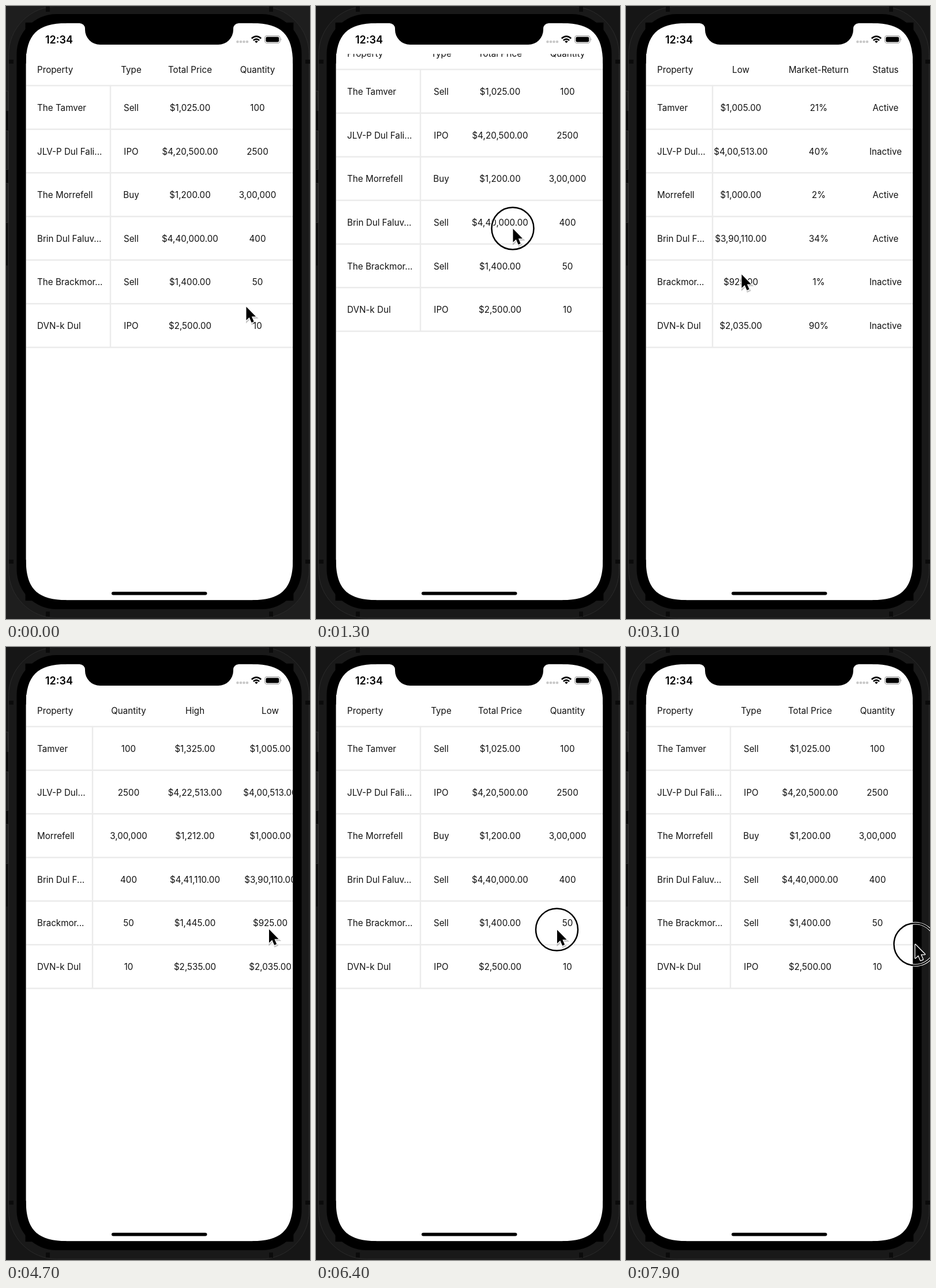
These frames come from a looping animation (527x1063 px, 8000 ms). An HTML page:

```html
<!DOCTYPE html>
<html lang="en">
<head>
<meta charset="utf-8">
<title>Portfolio table</title>
<style>
html, body { margin: 0; width: 100%; height: 100%; overflow: hidden; background: #161616; }
svg { display: block; width: 100%; height: 100%; }
text { font: 15.2px Inter, "Open Sans", sans-serif; fill: #111; }
.mid { text-anchor: middle; }
.clock { font-size: 18px; font-weight: 600; fill: #000; }
</style>
</head>
<body>
<svg viewBox="0 0 527 1063">
  <defs>
    <clipPath id="view"><rect x="35" y="83" width="462" height="900"/></clipPath>
    <path id="arrow" d="M0 0V23.5L5.3 18.5L9.2 27.5L13.2 25.8L9.4 17H16.6Z"/>
    <path id="corner" d="M-1 -1H70V0C20 0 0 20 0 70H-1Z"/>
  </defs>

  <rect id="back" width="527" height="1063"/>
  <rect x="4.5" y="0.5" width="521" height="1061" rx="84" fill="#191919" stroke="#2b2b2b"/>
  <g id="bands" fill="#0b0b0b"><path d="M0 182H4V216H0ZM0 284H4V307H0ZM0 375H3V450H0Z"/></g>
  <path d="M0 147.5H3.5V182M0 216.5H3.5V283.5H0M0 307.5H3.5V375.5H0" fill="#1c1c1c" stroke="#303030"/>
  <rect x="18.5" y="14" width="494" height="1032" rx="69"/>
  <rect x="34.6" y="29.8" width="462.6" height="1000.4" fill="#fff"/>
  <g id="corners"></g>

  <g clip-path="url(#view)">
    <g id="table">
      <g id="cells"></g>
      <rect id="cover" x="35" y="60" height="536" fill="#fff"/>
      <g id="lines" stroke="#ebebeb" stroke-width="2.5"></g>
      <g id="names"></g>
    </g>
  </g>

  <path d="M128 29V30A9 9 0 0 1 137 39V41A26 26 0 0 0 163 67H368A26 26 0 0 0 394 41V39A9 9 0 0 1 403 30V29Z"/>
  <text class="clock" x="68" y="64.5">12:34</text>
  <g id="dots" fill="#c9c9c9"></g>
  <g fill="none" stroke="#000" stroke-width="2.6">
    <path d="M425.8 56.3Q434 48.8 442.2 56.3M428.8 59.6Q434 55 439.2 59.6"/>
    <path d="M434 64.2L431.2 61.4Q434 59.2 436.8 61.4Z" fill="#000" stroke="none"/>
  </g>
  <rect x="448.6" y="51.6" width="26.4" height="12.8" rx="4" fill="none" stroke="#a2a2a2" stroke-width="1.2"/>
  <rect x="450.4" y="53.4" width="22.8" height="9.2" rx="2.4"/>
  <path d="M476.3 55.8Q478.6 58 476.3 60.2Z" fill="#a2a2a2"/>
  <rect x="183" y="1015.7" width="165.5" height="5.8" rx="2.9"/>

  <g id="pointer">
    <g id="ring" fill="none">
      <circle r="36.5" stroke="#fff" stroke-width="4.4"/>
      <circle r="36.5" stroke="#000" stroke-width="2.5"/>
    </g>
    <g transform="translate(.5 .5)">
      <use href="#arrow" transform="translate(1 2)" opacity=".22" stroke="#000" stroke-width="3"/>
      <use href="#arrow" stroke="#fff" stroke-width="2.6" stroke-linejoin="round"/>
      <use href="#arrow"/>
    </g>
  </g>
</svg>
<script>
const $ = id => document.getElementById(id);
const LOOP = 8000, STEP = 100, ROW = 75.65, TOP = 138;
const WIDE = 181, NARROW = 150, REACH = 482.5;

const add = (parent, tag, attrs, text = "") => {
  const el = document.createElementNS("http://www.w3.org/2000/svg", tag);
  for (const k in attrs) el.setAttribute(k, attrs[k]);
  el.textContent = text;
  $(parent).append(el);
  return el;
};
const rowY = i => i < 0 ? 116 : TOP + ROW * (i + 0.5) + 6.05;

// Phone details, mirrored about the centre of the screen
for (const sx of [1, -1]) for (const sy of [1, -1]) {
  const flip = `translate(266 530) scale(${sx} ${sy})`;
  add("corners", "use", { href: "#corner", transform: `${flip} translate(-231.4 -500.2)` });
  add("bands", "path", { d: "M-197 -529h7v9h-7ZM-261 -437h8v7h-8Z", transform: flip });
}
for (let i = 0; i < 4; i++) add("dots", "circle", { cx: 401.5 + 5.5 * i, cy: 62, r: 2.3 });

const columns = [
  [217, "Type", "Sell IPO Buy Sell Sell IPO"],
  [319, "Total Price", "$1,025.00 $4,20,500.00 $1,200.00 $4,40,000.00 $1,400.00 $2,500.00"],
  [436, "Quantity", "100 2500 3,00,000 400 50 10"],
  [551, "High", "$1,325.00 $4,22,513.00 $1,212.00 $4,41,110.00 $1,445.00 $2,535.00"],
  [681.5, "Low", "$1,005.00 $4,00,513.00 $1,000.00 $3,90,110.00 $925.00 $2,035.00"],
  [816.5, "Market-Return", "21% 40% 2% 34% 1% 90%"],
  [932.5, "Status", "Active Inactive Active Active Inactive Inactive"]
];
for (const [x, head, values] of columns)
  [head, ...values.split(" ")].forEach((s, i) =>
    add("cells", "text", { class: "mid", x, y: rowY(i - 1) }, s));

// Wide and narrow label of each row
const labels = [
  ["The Tamver", "Tamver"],
  ["JLV-P Dul Fali...", "JLV-P Dul..."],
  ["The Morrefell", "Morrefell"],
  ["Brin Dul Faluv...", "Brin Dul F..."],
  ["The Brackmor...", "Brackmor..."],
  ["DVN-k Dul", "DVN-k Dul"]
];
add("names", "text", { x: 54, y: rowY(-1) }, "Property");
const names = labels.map((l, i) => add("names", "text", { x: 54, y: rowY(i) }, l[0]));

for (let i = 0; i < 7; i++) {
  const y = TOP + i * ROW;
  add("lines", "line", { x1: 35, x2: 497, y1: y, y2: y });
}
const edge = add("lines", "line", { y1: TOP, y2: TOP + 6 * ROW });

const ease = (t, from, to) => {
  const u = Math.min(1, Math.max(0, (t - from) / (to - from)));
  return u * u * (3 - 2 * u);
};

// Pointer glides: start, end, goal; it rests in between
const HOME = { x: 416, y: 521 };
const glides = [
  [0, 200, 341, 438], [200, 1300, 341, 386], [1800, 2300, 448, 535],
  [2400, 2800, 200, 465], [3900, 4600, 455.5, 489], [4800, 5400, 290, 175],
  [5500, 6000, 425, 518], [6300, 6400, 417.5, 490], [6400, 7000, 115, 480],
  [7100, 7900, 501, 515.5]
];
const presses = [[200, 1500], [2200, 2800], [4000, 4600], [6000, LOOP]];
const GRAB = 438, FREE = 1500;

// Fading up and down swing of the first drag
const shake = t => t < 200 || t > FREE ? 0 :
  290 * Math.sin(2 * Math.PI * (t - 200) / 650) * Math.exp(-(((t - 200) / 800) ** 6));

function pointer(t) {
  let { x, y } = HOME;
  for (const [from, to, gx, gy] of glides) {
    const k = ease(t, from, to);
    x += (gx - x) * k;
    y += (gy - y) * k;
  }
  return { x, y: y + shake(t) };
}

const rubber = d => Math.sign(d) * 930 * (1 - 1 / (Math.abs(d) * 0.55 / 930 + 1));
function bounce(t) {
  if (t < 200 || t >= 1900) return 0;
  const pull = rubber(pointer(Math.min(t, FREE)).y - GRAB);
  return pull * Math.exp(Math.min(0, FREE - t) / 110);
}

const sideScroll = (t, x) => t < 6300
  ? REACH * (ease(t, 2400, 3100) - ease(t, 3900, 5425))
  : Math.max(0, 417.5 - x);

function draw(now) {
  const t = Math.floor((now % LOOP) / STEP) * STEP;
  const { x, y } = pointer(t);
  const side = sideScroll(t, x);
  const pin = Math.max(NARROW, WIDE - side);
  const narrow = side > 12 ? 1 : 0;

  $("back").setAttribute("fill", t < 100 ? "#1e1e1e" : "#161616");
  $("table").setAttribute("transform", `translate(0 ${bounce(t)})`);
  $("cells").setAttribute("transform", `translate(${-side} 0)`);
  $("cover").setAttribute("width", pin - 35);
  edge.setAttribute("x1", pin);
  edge.setAttribute("x2", pin);
  names.forEach((el, i) => el.textContent = labels[i][narrow]);
  $("pointer").setAttribute("transform", `translate(${x} ${y})`);
  $("ring").style.display = presses.some(([a, b]) => t >= a && t < b) ? "" : "none";
}

let start;
function tick(now) {
  start ??= now;
  draw(now - start);
  requestAnimationFrame(tick);
}
draw(0);
requestAnimationFrame(tick);
</script>
</body>
</html>
```
